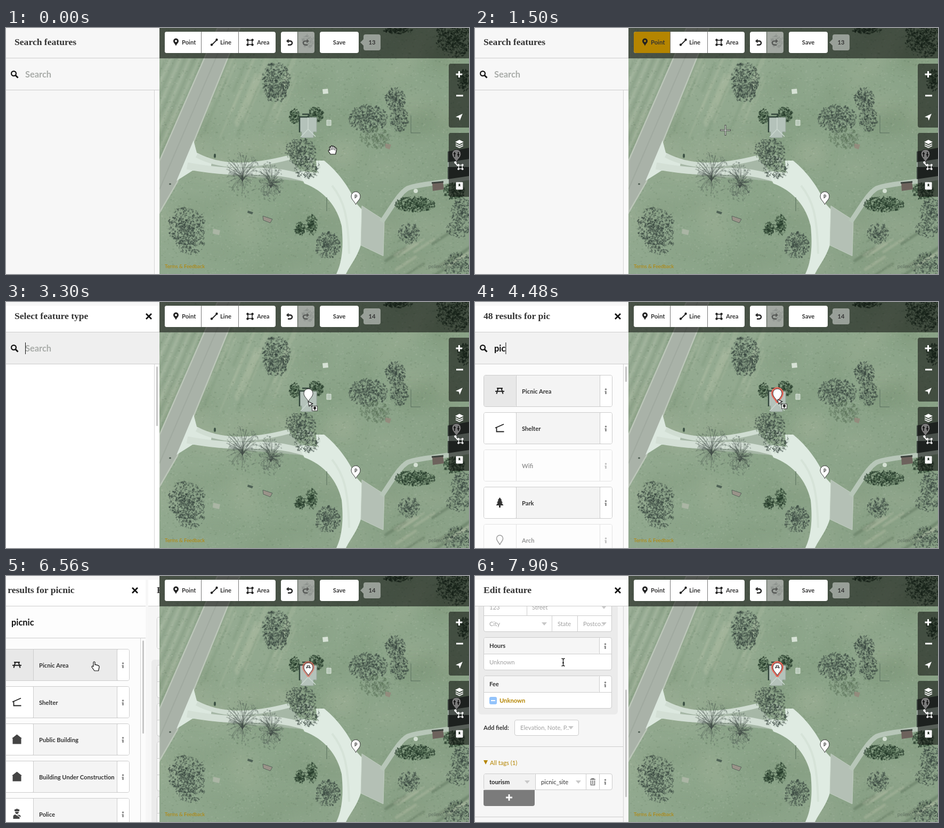
Write an HTML page with a canvas that moves like this. It is 869x462 px and loops after 8 s.

```html
<!DOCTYPE html>
<html lang="en">
<head>
<meta charset="utf-8">
<title>Adding a point</title>
<style>
html, body { margin: 0; width: 869px; height: 462px; overflow: hidden; background: #f7f7f7; }
canvas, svg { position: absolute; left: 0; top: 0; display: block; }
text { font-family: Lato, Roboto, sans-serif; white-space: pre; }
.title { font: bold 17.6px "Liberation Serif", "Noto Serif", serif; fill: #333; }
</style>
</head>
<body>
<canvas id="map" width="869" height="462"></canvas>
<svg id="stage" width="869" height="462" viewBox="0 0 869 462">
  <defs>
    <clipPath id="sideClip"><rect width="288" height="462"/></clipPath>
    <clipPath id="bodyClip"><rect y="57" width="288" height="405"/></clipPath>
  </defs>
  <g id="pins"></g>
  <g id="tools"></g>
  <g clip-path="url(#sideClip)">
    <rect width="288" height="462" fill="#f7f7f7"/>
    <g id="home"></g>
    <g id="picker"></g>
    <g id="editor"></g>
  </g>
  <g id="cursor"></g>
</svg>
<script>
const $ = id => document.getElementById(id);

// ---- aerial map ----
const ctx = $('map').getContext('2d');
let seed = 11;
const rnd = () => (seed = (seed * 16807) % 2147483647) / 2147483647;
const span = (a, b) => a + (b - a) * rnd();

function shape(d, fill, stroke, w) {
  const p = new Path2D(d);
  if (fill) { ctx.fillStyle = fill; ctx.fill(p); }
  if (stroke) { ctx.strokeStyle = stroke; ctx.lineWidth = w || 1; ctx.stroke(p); }
}

function blob(x, y, rx, ry, color, turn = 0) {
  ctx.fillStyle = color;
  ctx.beginPath();
  ctx.ellipse(x, y, rx, ry, turn, 0, 7);
  ctx.fill();
}

// ragged crown: many small leaves, denser towards the middle
function tree(x, y, rx, ry, n, dark, light) {
  for (let i = 0; i < n * 3; i++) {
    const a = span(0, 6.283), d = 1.12 * rnd() ** .65;
    blob(x + Math.cos(a) * d * rx, y + Math.sin(a) * d * ry, span(.8, 3), span(.6, 1.6),
      rnd() < .7 ? dark : light, span(0, 3));
  }
}

function bareTree(x, y, rx, ry) {
  for (let i = 0; i < 60; i++) {
    const a = span(0, 6.283), d = span(.5, 1);
    shape(`M${x} ${y + ry * .3}Q${x + span(-8, 8)} ${y} ${x + Math.cos(a) * rx * d} ${y + Math.sin(a) * ry * d}`,
      null, 'rgba(70,82,76,.38)', span(.6, 1.4));
  }
  tree(x, y, rx * .85, ry * .9, 60, 'rgba(70,84,76,.28)', 'rgba(160,176,156,.3)');
}

function drawMap() {
  const base = ctx.createLinearGradient(288, 0, 869, 462);
  base.addColorStop(0, '#9aae96');
  base.addColorStop(.5, '#8da68b');
  base.addColorStop(1, '#8aa187');
  ctx.fillStyle = base;
  ctx.fillRect(288, 0, 581, 462);

  ctx.filter = 'blur(14px)';
  for (let i = 0; i < 70; i++)
    blob(span(288, 869), span(0, 462), span(14, 50), span(8, 24),
      rnd() < .5 ? 'rgba(186,193,170,.16)' : 'rgba(100,130,98,.15)');
  ctx.filter = 'blur(1.5px)';
  for (let i = 0; i < 24; i++) {
    const x = span(410, 550), y = span(30, 120), h = span(40, 110);
    shape(`M${x} ${y}l${-h * .42} ${h}`, null, i % 3 ? 'rgba(196,203,180,.24)' : 'rgba(100,128,98,.16)', span(2, 6));
  }
  for (let i = 0; i < 9; i++)
    shape(`M${372 - i * 9} 57L${290 - i * 9} 245`, null, i % 2 ? 'rgba(184,195,176,.35)' : 'rgba(106,130,104,.22)', 4);
  for (let i = 0; i < 16; i++) {
    const x = span(740, 880), y = span(375, 450);
    shape(`M${x} ${y}l-40 26`, null, i % 2 ? 'rgba(190,196,172,.35)' : 'rgba(74,98,76,.35)', span(2, 6));
  }
  ctx.filter = 'blur(.6px)';
  for (let i = 0; i < 5000; i++) {
    ctx.fillStyle = rnd() < .5 ? 'rgba(205,214,194,.12)' : 'rgba(62,90,64,.11)';
    ctx.fillRect(span(288, 869), span(0, 462), span(1, 4), span(1, 3));
  }

  // road, driveway, parking and footpath
  shape('M397 0H439L353 212L321 290L288 347V250Z', '#a9b2a8', '#bcc6b9', 2.5);
  shape('M418 0L288 303', null, 'rgba(138,148,139,.3)', 2);
  shape('M355 236C400 264 460 258 530 242L572 290C500 280 440 282 345 266Z', '#a6b7a6');
  shape('M352 211L358 234L386 252L384 266L350 268L320 287Z', '#dce8df');
  shape('M358 239C400 261 450 264 532 243', null, '#d0ddd2', 9);
  shape('M340 259C400 270 440 270 480 269C520 270 545 277 580 288', null, '#d3dfd5', 13);
  shape('M582 249L597 249C628 274 646 304 658 330L669 342L667 404C660 430 648 442 638 462H620' +
    'C633 436 633 400 630 372C622 336 598 306 560 292L548 268L584 272Z', '#dfebe2');
  shape('M612 296C634 324 642 350 644 424', null, 'rgba(200,215,203,.4)', 4);
  shape('M668 334L710 361L708 428L666 408Z', '#b4c0b5', '#c0cdc0', 1);
  shape('M705 364C722 340 738 310 754 301C776 292 830 290 872 280', null, '#b7c6b8', 9);

  const dark = 'rgba(54,68,62,.5)', mid = 'rgba(122,142,122,.5)';
  tree(507, 98, 24, 30, 170, dark, mid);
  tree(506, 124, 20, 14, 60, dark, mid);
  tree(680, 170, 33, 23, 190, dark, mid);
  tree(693, 206, 26, 18, 80, 'rgba(92,116,90,.5)', mid);
  tree(731, 134, 17, 20, 100, dark, mid);
  tree(738, 172, 16, 20, 80, dark, mid);
  tree(553, 232, 26, 23, 150, dark, mid);
  tree(565, 262, 22, 20, 70, dark, 'rgba(190,205,190,.5)');
  tree(339, 372, 32, 32, 200, dark, mid);
  tree(346, 403, 24, 20, 60, dark, mid);
  bareTree(444, 274, 36, 44);
  bareTree(497, 288, 26, 38);
  tree(603, 408, 22, 22, 120, dark, mid);
  tree(756, 385, 18, 18, 75, dark, mid);
  tree(856, 345, 18, 24, 90, dark, mid);
  tree(848, 445, 24, 22, 90, dark, mid);
  tree(848, 378, 20, 14, 40, dark, mid);

  const shrub = 'rgba(38,60,44,.6)', leaf = 'rgba(86,114,86,.6)';
  tree(542, 166, 9, 13, 45, shrub, leaf);
  tree(581, 163, 13, 13, 60, shrub, leaf);
  tree(552, 377, 9, 11, 40, shrub, leaf);
  tree(573, 370, 10, 17, 55, shrub, leaf);
  tree(768, 331, 34, 13, 150, shrub, leaf);
  tree(841, 307, 18, 14, 70, shrub, leaf);
  tree(842, 18, 32, 34, 220, shrub, leaf);
  tree(736, 4, 25, 6, 50, shrub, leaf);
  tree(860, 98, 12, 18, 60, shrub, leaf);
  tree(567, 25, 11, 11, 20, shrub, leaf);

  // shed, benches and other small objects
  shape('M551 168H583V195H577V206H555V195H551Z', '#b4c2ba', '#94a499', 1);
  shape('M551 196V167H568V162H556', null, '#34473d', 2.5);
  shape('M567 168V190L553 205M567 190L581 204', null, '#cad7cf', 1.5);
  shape('M594 115L604 114L605 123L595 124Z', '#d7e2d6');
  shape('M602 173H610V183H602Z', '#b9c9ba', '#dbe5da', 1);
  shape('M712 217L723 219L720 228L712 225Z', 'rgba(150,130,120,.7)');
  shape('M760 165V197H778', null, 'rgba(96,115,99,.7)', 1.5);
  shape('M482 353L500 359L496 366L483 361Z', '#9a9389', '#55645a', 1);
  shape('M454 343l10 3l-2 4l-9-3Z', '#4f6256');
  shape('M389 377l13 3l-2 9l-12-3Z', '#aab5a4');
  shape('M602 318V344', null, 'rgba(90,112,94,.7)', 1.5);
  shape('M800 290L820 288L822 303L801 306Z', '#6d625c');
  shape('M799 291L821 289', null, '#3c423d', 3);
  shape('M829 232L869 225V278L829 284Z', '#3c4540');
  shape('M829 252L869 246V261H829Z', '#9caaa0');
  blob(308, 293, 2, 1.5, '#4c5b50');
  blob(392, 240, 2, 4, '#3d5245');
  blob(769, 306, 4, 4, '#d4e0d3');
  ctx.filter = 'none';
}

// ---- svg helpers ----
const rect = (x, y, w, h, fill, stroke = 'none', r = 0) =>
  `<rect x="${x}" y="${y}" width="${w}" height="${h}" rx="${r}" fill="${fill}" stroke="${stroke}"/>`;
const path = (d, fill = 'none', stroke = 'none', w = 1, more = '') =>
  `<path d="${d}" fill="${fill}" stroke="${stroke}" stroke-width="${w}" ${more}/>`;
const text = (x, y, s, fill = '#333', bold = true, size = 11.2, anchor = 'start') =>
  `<text x="${x}" y="${y}" fill="${fill}" font-weight="${bold ? 700 : 400}" font-size="${size}" text-anchor="${anchor}">${s}</text>`;
const group = (x, y, s, k = 1, more = '') => `<g transform="translate(${x} ${y}) scale(${k})" ${more}>${s}</g>`;
const title = s => `<text class="title" x="16" y="32">${s}</text>`;
const gray = '#a0a0a0', rule = '#ccc', gold = '#b58500';

const pinPath = 'M0 15C-2 9.5-8.5 6-8.5-.5A8.5 8.5 0 0 1 8.5-.5C8.5 6 2 9.5 0 15Z';
const plus = (c, r, w) => path(`M${-r} 0H${r}M0 ${-r}V${r}`, 'none', c, w);
const info = (x, y) => group(x, y, `<circle cy="-4" r="1.8" fill="#888"/>` + path('M-2-.8H1.3V5H-1.3V1H-2Z', '#888'));
const drop = (x, y) => path(`M${x - 5} ${y - 3}h10l-5 6Z`, '#c8c8c8');
const close = path('M263 22L273 32M273 22L263 32', 'none', '#111', 2.8);
const lens = path('M18 89L22.5 93.5', 'none', '#111', 2.8) +
  '<circle cx="14.5" cy="85.5" r="4.4" fill="none" stroke="#111" stroke-width="2.2"/>';

const icons = {
  picnic: path('M-5.5-5H5.5M-8.5.8H8.5M-3-5L-6 5.5M3-5L6 5.5', 'none', '#222', 2),
  shelter: path('M-8.5-.5L7.5-7.5M-6-1.5V6.5H8', 'none', '#222', 1.8),
  house: path('M0-9.5L9.5-2H8V8.5H-8V-2H-9.5Z', '#444'),
  tree: path('M0-10L4-4.5H2.5L5.5 0H3.5L7 5H1.5V9H-1.5V5H-7L-3.5 0H-5.5L-2.5-4.5H-4Z', '#333'),
  police: path('M-5-8L0-10L5-8L4-5H-4ZM-3.5-4H3.5Q3 0 0 0T-3.5-4ZM-7 9V4Q-6 1-3 1L5 6V9ZM0 1.5H4Q7 2 7 4.5V6Z', '#444'),
  pin: path('M0 9C-1 5-6 2-6-3A6 6 0 0 1 6-3C6 2 1 5 0 9Z', 'none', '#444', 1.5),
  cross: plus('#444', 7, 5),
  none: ''
};

// ---- toolbar and map controls ----
const dot = (x, y, c) => `<circle cx="${x}" cy="${y}" r="2.2" fill="${c}"/>`;
const areaIcon = c => path('M-4-4H4V4H-4Z', 'none', c, 1.5) + dot(-4.5, -4.5, c) + dot(4.5, -4.5, c) + dot(-4.5, 4.5, c) + dot(4.5, 4.5, c);
const undo = path('M-4-2.5H1.5A3.6 3.6 0 0 1 1.5 4.7H-3', 'none', '#222', 2.4) + path('M-6-2.5L-1.5-6.5V1.5Z', '#222');

function buildTools() {
  const shade = 'rgba(0,0,0,.52)';
  $('tools').innerHTML =
    rect(288, 0, 581, 57, shade) +
    rect(298, 7, 208, 40, '#fff', 'none', 4) +
    `<path id="pointBtn" d="M302 7H366V47H302Q298 47 298 43V11Q298 7 302 7Z"/>` +
    path('M366.5 7V47M436.5 7V47', 'none', '#777') +
    path('M319 34C318 30 314 28 314 24.5A5 5 0 0 1 324 24.5C324 28 320 30 319 34ZM319 22.5A2 2 0 1 0 319 26.5A2 2 0 1 0 319 22.5Z', '#222', 'none', 1, 'fill-rule="evenodd"') +
    path('M386 32L396 22', 'none', '#222', 1.8) + dot(386, 31.5, '#222') + dot(395.5, 22, '#222') +
    group(458, 27, areaIcon('#222')) +
    text(330, 31, 'Point') + text(402, 31, 'Line') + text(471, 31, 'Area') +
    path('M520 7H547V47H520Q516 47 516 43V11Q516 7 520 7Z', '#fff') +
    path('M548 7H575Q579 7 579 11V43Q579 47 575 47H548Z', 'rgba(255,255,255,.5)') +
    group(532, 27, undo) + `<g transform="translate(563 27) scale(-1 1)" opacity=".55">${undo}</g>` +
    rect(589, 7, 73, 40, '#fff', 'none', 4) + text(625.5, 31, 'Save', '#333', true, 11.2, 'middle') +
    path('M665 27L671 21V16Q671 12 675 12H699Q703 12 703 16V38Q703 42 699 42H675Q671 42 671 38V33Z', 'rgba(255,255,255,.45)') +
    `<text id="count" x="687" y="31" font-size="11.2" font-weight="700" fill="#333" text-anchor="middle"></text>` +
    path('M869 67H835Q831 67 831 71V183Q831 187 835 187H869ZM869 197H835Q831 197 831 201V313Q831 317 835 317H869Z', shade) +
    group(850.5, 87, plus('#fff', 6, 3)) + path('M845 127H858', 'none', '#fff', 3) +
    path('M857 161L851.5 174L850 168.5L844 167Z', '#fff') +
    path('M851 210L859 214L851 218L843 214Z', '#fff') +
    path('M844 217.5L851 221L858 217.5M844 221L851 224.5L858 221', 'none', '#fff', 1.8) +
    path('M843 253L848 259', 'none', '#fff', 2) + dot(843.5, 252.5, '#fff') + group(853, 261, areaIcon('#fff'), .85) +
    path('M845 290H857V303H845ZM849 292V299L851 297L853 299V292Z', '#fff', '#fff', 1, 'fill-rule="evenodd"') +
    text(298, 451, 'Terms &amp; Feedback', gold, false, 9.4) +
    text(862, 451, 'pelimo, barkelaw', 'rgba(90,105,92,.8)', false, 9.4, 'end');
}

function buildPins() {
  const pin = (x, y, s) => group(x, y, path(pinPath, '#fff', '#333', 1) + s);
  $('pins').innerHTML =
    pin(845.5, 237, path('M-3.5-4V5M3.5-4V5M-5.5-1H-1.5M1.5 1H5.5', 'none', '#333', 1.8)) +
    pin(656.5, 316.5, text(0, 3, 'P', '#333', true, 8.5, 'middle')) +
    `<g id="newPin" transform="translate(567.5 172)">` +
    path(pinPath, '#e8685a', '#e8685a', 6, 'id="glow" stroke-linejoin="round"') + path(pinPath, '#fff', '#333', 1) +
    `<g id="pinIcon" transform="translate(0 -1) scale(.52)">${icons.picnic}</g></g>`;
}

// ---- sidebar panes ----
const track = (y, thumbY, h) => path(`M278.5 ${y}V462`, 'none', '#d4d4d4') +
  (h ? rect(282, thumbY, 3, h, '#c6c6c6', 'none', 1.5) : '');

function card(y, name, icon, { opacity = 1, iconFill = '#fff', fill = '#f4f4f4' } = {}) {
  return `<g opacity="${opacity}">` + rect(16.5, y + .5, 241, 59, fill, rule, 3.5) +
    rect(17, y + 1, 60, 58, iconFill, 'none', 3) + rect(235, y + 1, 22, 58, '#fff', 'none', 3) +
    path(`M77.5 ${y}v60M234.5 ${y}v60`, 'none', rule) + group(46.5, y + 30, icons[icon]) +
    text(88, y + 35, name) + info(245.5, y + 31) + '</g>';
}

const stock = [['Park', 'tree'], ['Hospital', 'cross'], ['Place of Worship', 'house'], ['Cafe', 'pin'], ['Restaurant', 'pin']];
const found = [['Picnic Area', 'picnic'], ['Shelter', 'shelter'], ['Public Building', 'house'], ['Building Under Construction', 'house'], ['Police', 'police']];
const partial = [found[0], found[1], ['Wifi', 'none', .5], ['Park', 'tree'], ['Arch', 'pin', .5]];
const faded = found.map(([n, i], k) => [n, i, k > 1 ? .5 : 1]);

// time, query, heading, items, opacity, thumb height
const searches = [
  [3300, '', 'Select feature type', stock, 0, 112],
  [3450, '', 'Select feature type', stock, .5, 112],
  [3590, '', 'Select feature type', stock, 1, 112],
  [4190, 'p', '92 results for p', [stock[0], ['Police', 'police'], ['Pub', 'pin'], ['Post Box', 'pin'], stock[2]], 1, 29],
  [4340, 'pi', '61 results for pi', [found[0], ['Pier', 'pin'], ['Wifi', 'none'], stock[0], ['Arch', 'pin']], 1, 29],
  [4480, 'pic', '48 results for pic', partial, 1, 29],
  [4630, 'picn', '9 results for picn', faded, 1, 175],
  [4780, 'picni', '9 results for picni', found, 1, 175],
  [4930, 'picnic', '9 results for picnic', found, 1, 175]
];

function pickerHtml([, query, heading, items, opacity, thumb], hover, typing) {
  const tone = !typing ? '#fdfdfd' : opacity ? '#f2f2f2' : '#efefef';
  return rect(0, 7, 288, 49, '#fff') + rect(0, 57, 288, 59, tone) + rect(0, 117, 288, 345, opacity ? '#fcfcfc' : '#fff') +
    path('M0 56.5H288M0 116.5H288', 'none', rule) + title(heading) + close + lens +
    `<text id="query" x="36" y="93" font-size="16.4" font-weight="700" fill="${query ? '#111' : '#a9aca9'}">${query || 'Search'}</text>` +
    (typing ? `<path id="caret" d="M0 76V98" stroke="#111"/>` : '') +
    `<g opacity="${opacity}">` + items.map(([name, icon, fade = 1], i) => card(137 + 70 * i, name, icon, {
      opacity: fade,
      iconFill: i === 0 && (query || hover) ? '#e8e8e8' : '#fff',
      fill: i === 0 && hover ? '#ebebeb' : fade < 1 ? '#fff' : '#f4f4f4'
    })).join('') + '</g>' + track(117, 121, thumb);
}

function field(y, name, h, inner) {
  return rect(16.5, y + .5, 240, h - 1, '#fff', rule, 3.5) + rect(17, y + 1, 216, 30, '#f6f6f6', 'none', 3) +
    path(`M16 ${y + 31.5}H257M233.5 ${y}v31`, 'none', rule) +
    text(27, y + 20, name) + info(244.5, y + 17) + inner;
}
const hint = (x, y, s) => text(x, y, s, gray, false);

function buildEditor() {
  const form = card(67, 'Picnic Area', 'picnic', { fill: '#f6f6f6' }) +
    rect(6, 147, 262, 402, '#ebebeb', 'none', 6) + path('M127 148L137 138L147 148Z', '#ebebeb') +
    field(157, 'Name', 62, hint(27, 208, 'Common name (if any)') + path('M233.5 188V219', 'none', rule) + group(244.5, 204, plus('#888', 6, 3))) +
    field(229, 'Operator', 62, hint(27, 280, 'Unknown')) +
    field(301, 'Address', 93, path('M16 363.5H257M97.5 332V363M144.5 363V394M192.5 363V394', 'none', rule) +
      hint(27, 352, '123') + hint(107, 352, 'Street') + drop(242, 348) +
      hint(27, 383, 'City') + drop(130, 379) + hint(155, 383, 'State') + hint(203, 383, 'Postco..') + drop(242, 379)) +
    field(404, 'Hours', 62, hint(27, 455, 'Unknown')) +
    field(476, 'Fee', 62, rect(27, 516, 14, 14, '#93c3fb', 'none', 3) + path('M30 523H38', 'none', '#fff', 2) + text(46, 527, 'Unknown', gold)) +
    text(16, 578, 'Add field:') + rect(74.5, 559.5, 120, 29, '#fff', rule, 3.5) + hint(85, 578, 'Elevation, Note, P..') + drop(180, 574) +
    path('M0 609.5H278M0 741.5H278', 'none', rule) +
    path('M16 635H24L20 643Z', gold) + text(28, 644, 'All tags (1)', gold, false) +
    rect(16.5, 660.5, 241, 30, '#fff', rule, 3.5) + rect(17, 661, 96, 29, '#f2f2f2', 'none', 3) +
    path('M113.5 660V691M208.5 660V691M233.5 660V691', 'none', rule) +
    text(27, 680, 'tourism', '#222') + drop(98, 676) + text(124, 680, 'picnic_site', '#333', false) + drop(194, 676) +
    path('M216 671H226M219 671V669.5H223V671M217.5 673V681.5H224.5V673M221 673V680', 'none', '#777', 1.6) + info(244.5, 676) +
    path('M16 691H112V717Q112 721 108 721H20Q16 721 16 717Z', '#7b7b7b') + group(64, 705, plus('#fff', 6, 2.8));
  $('editor').innerHTML = rect(0, 0, 288, 462, '#f6f6f6') +
    `<g clip-path="url(#bodyClip)"><g id="form">${form}</g></g>` +
    rect(0, 7, 288, 49, '#fff') + path('M0 56.5H288', 'none', rule) + title('Edit feature') + close +
    track(57, 0, 0) + `<rect id="thumb" x="282" width="3" height="202" rx="1.5" fill="#c6c6c6"/>`;
}

function buildHome() {
  $('home').innerHTML = title('Search features') + path('M0 56.5H288M0 116.5H288', 'none', rule) + lens +
    text(36, 93, 'Search', '#a9aca9', true, 16.4) + rect(279, 117, 9, 345, '#fafafa') + track(117, 0, 0);
}

// ---- cursors ----
const ink = 'stroke-linejoin="round"';
const cursors = {
  grab: path('M-4 8L-8 2Q-8-1-5 1L-6-5Q-4.5-7-3.5-4.5L-3-7Q-1-9-.5-6.5L0-7Q2-8 2.5-5.5Q5-7 5.2-3.5Q7.8-4.5 7.5-1L5.5 8Z', '#fff', '#111', 1.2, ink) +
    path('M-3.2-4L-2.5 0M-.4-6V0M2.4-5V0M5-3L4.6 1', 'none', '#111', .9),
  point: path('M-1 10L-6 3Q-6 0-3 2V-6Q-1.5-8.5 0-6V-1Q2-2.5 3-.5Q5-1.5 6 .5Q8 0 8 3L6.5 10Z', '#fff', '#111', 1.2, ink),
  cross: path('M-10 0H10M0-10V10', 'none', '#444', 3) + path('M-9 0H9M0-9V9', 'none', '#e4ebe2', 1.2),
  place: path('M0 0L9 4L5.5 5L8.5 8.5L7 10L4 6L2 9Z', '#fff', '#111', 1.1, ink) + rect(7.5, 8.5, 10, 9, '#e9ece8', '#444') +
    path('M12.5 16.5C12 14.5 10 13.8 10 12A2.5 2.5 0 0 1 15 12C15 13.8 13 14.5 12.5 16.5Z', '#222'),
  arrow: path('M0 0V14L3.3 11.2L5.6 16.5L8.2 15.3L6 10.3H10.3Z', '#111', '#fff', 1, ink),
  beam: path('M-3-7Q0-7 0-5Q0-7 3-7M0-6V6M-3 7Q0 7 0 5Q0 7 3 7M-1.5 1H1.5', 'none', '#111', 1.3)
};

// time, cursor, x, y
const moves = [
  [0, 'grab', 613, 229], [150, 'grab', 590, 204], [300, 'grab', 524, 146], [450, 'grab', 438, 84],
  [600, 'point', 362, 42], [750, 'point', 336, 33],
  [1350, 'cross', 394, 98], [1500, 'cross', 470, 192], [1650, 'cross', 508, 226], [1800, 'cross', 534, 236],
  [1950, 'cross', 553, 229], [2100, 'cross', 563, 214], [2250, 'cross', 567, 203],
  [2400, 'cross', 567.5, 200], [2550, 'cross', 567.5, 196], [2700, 'cross', 567.5, 190], [2850, 'cross', 567.5, 187],
  [3300, 'place', 567, 187], [3590, 'place', 568, 183],
  [5370, 'grab', 500, 182], [5520, 'grab', 382, 177], [5670, 'arrow', 264, 171], [5810, 'point', 194, 169], [5960, 'point', 167, 168],
  [6860, 'arrow', 165, 161], [7900, 'beam', 165.5, 162]
];
const glows = [[0, 0], [3450, .5], [3590, 1], [6410, .5], [6560, .65], [6710, .85], [6860, 1]];
const slides = [[0, 0], [6560, 26], [6710, 196], [6860, 293]];
const scrolls = [[0, 0], [7460, 10], [7610, 108], [7760, 238], [7900, 299]];

const at = (list, t) => list.reduce((hit, row) => row[0] <= t ? row : hit, list[0]);
const show = (id, on) => $(id).setAttribute('display', on ? 'inline' : 'none');
let pickerKey, cursorKey;

function update(t) {
  const placed = t >= 3300;
  show('home', !placed);
  show('picker', placed && t < 6860);
  show('editor', t >= 6560);
  show('newPin', placed);
  show('pinIcon', t >= 6410);
  $('glow').setAttribute('opacity', at(glows, t)[1]);
  $('count').textContent = placed ? 14 : 13;
  $('pointBtn').setAttribute('fill', t >= 1350 && !placed ? '#b58500' : t >= 600 && !placed ? '#ececec' : '#fff');

  const search = at(searches, t), hover = t >= 5810, typing = t < 5370;
  const key = [search[0], hover, typing].join();
  if (key !== pickerKey) {
    pickerKey = key;
    $('picker').innerHTML = pickerHtml(search, hover, typing);
  }
  if (typing && placed) {
    const x = search[1] ? $('query').getComputedTextLength() + 36.5 : 36.5;
    $('caret').setAttribute('transform', `translate(${x} 0)`);
  }

  const slide = at(slides, t)[1], scroll = at(scrolls, t)[1];
  $('picker').setAttribute('transform', `translate(${-slide} 0)`);
  $('editor').setAttribute('transform', `translate(${293 - slide} 0)`);
  $('form').setAttribute('transform', `translate(0 ${10 - scroll})`);
  $('thumb').setAttribute('y', 61 + scroll * .509);

  const [, kind, x, y] = at(moves, t);
  if (kind !== cursorKey) {
    cursorKey = kind;
    $('cursor').innerHTML = cursors[kind];
  }
  $('cursor').setAttribute('transform', `translate(${x} ${y})`);
}

drawMap();
buildTools();
buildPins();
buildHome();
buildEditor();

const start = performance.now();
function frame() {
  update((performance.now() - start) % 8000);
  requestAnimationFrame(frame);
}
frame();
</script>
</body>
</html>
```
